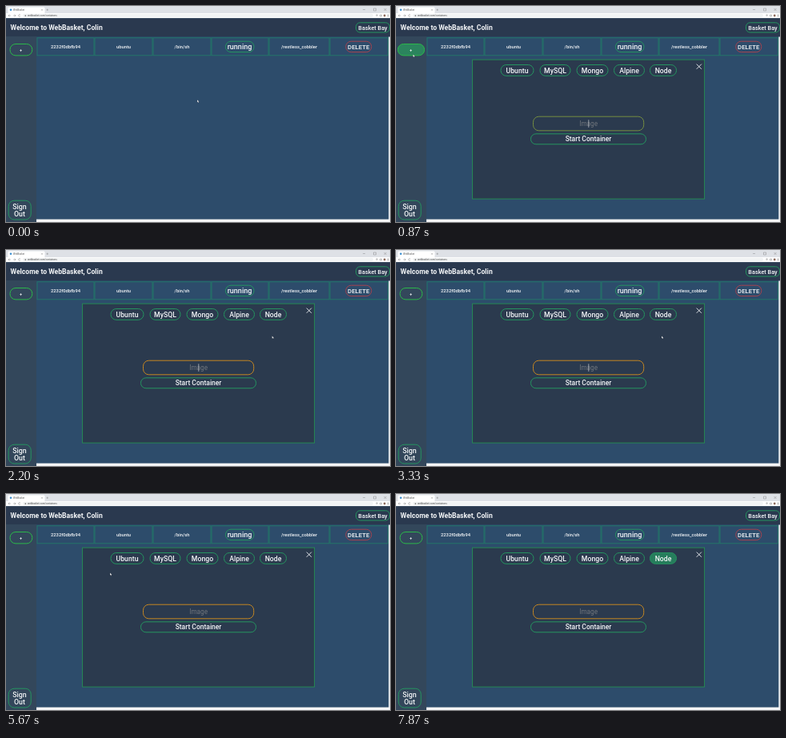
An HTML page that plays this animation: 480 px wide and 270 px high, repeating every 8000 ms.

```html
<!DOCTYPE html>
<html lang="en">
<head>
<meta charset="utf-8">
<title>Containers</title>
<style>
html, body { margin: 0; width: 100%; height: 100%; overflow: hidden; background: #2d4c6b; }
svg { display: block; width: 480px; height: 270px; }
text { font-family: Roboto, "Liberation Sans", sans-serif; font-weight: 500; fill: #f4f6f8; }
.mid { text-anchor: middle; }
</style>
</head>
<body>
<svg id="stage" viewBox="0 0 480 270"></svg>
<script>
const LOOP = 8000;
const GREEN = '#259460', TEAL = '#237a69', DARK = '#2b3a4e';
const stage = document.getElementById('stage');

function add(parent, tag, attrs, content) {
  const el = document.createElementNS('http://www.w3.org/2000/svg', tag);
  for (const key in attrs) el.setAttribute(key, attrs[key]);
  if (content) el.textContent = content;
  parent.appendChild(el);
  return el;
}
const box = (p, x, y, width, height, fill, more) =>
  add(p, 'rect', { x, y, width, height, fill, ...more });
const line = (p, d, stroke, width) =>
  add(p, 'path', { d, stroke, 'stroke-width': width, fill: 'none' });
const label = (p, x, y, size, str, style = '') =>
  add(p, 'text', { x, y, 'font-size': size, class: 'mid', style }, str);
const pill = (p, x, y, w, h, r, stroke, fill = 'none') =>
  box(p, x, y, w, h, fill, { rx: r, stroke, 'stroke-width': 1 });

// Browser bar
box(stage, 0, 0, 480, 9, '#dee1e6');
box(stage, 2.5, 1.5, 46, 8, '#fff', { rx: 1.5 });
add(stage, 'circle', { cx: 6, cy: 4.8, r: 1.3, fill: '#3b8fd0' });
add(stage, 'text', { x: 9, y: 5.9, 'font-size': 2.8, style: 'fill:#777' }, 'WebBasket');
line(stage, 'M44 3.8l2 2m0-2l-2 2M50.5 4.8h2.4m-1.2-1.2v2.4', '#777', 0.4);
line(stage, 'M446 4.5h3M459.5 3h3v3h-3zM472.5 3l3 3m0-3l-3 3', '#777', 0.4);
box(stage, 0, 9, 480, 6.3, '#fff');
box(stage, 21, 9.8, 438, 4.3, '#f1f3f4', { rx: 2.1 });
line(stage, 'M6 12H3m1.3-1.3L3 12l1.3 1.3M9 12h3m-1.3-1.3L12 12l-1.3 1.3M18 11.2a1.3 1.3 0 1 0 .1 1.3', '#666', 0.4);
box(stage, 23.6, 11.4, 1.5, 1.5, '#777');
add(stage, 'text', { x: 27, y: 13, 'font-size': 3, style: 'fill:#666' }, 'webbasket.com/containers');
line(stage, 'M464 12.8l-1-1a.7 .7 0 1 1 .2 .2M467.5 11h2v2h-2z', '#666', 0.4);
add(stage, 'circle', { cx: 473.2, cy: 12, r: 1.4, fill: '#8b6a5c' });
line(stage, 'M477.6 10.5v3', '#555', 0.6);

// Page
box(stage, 0, 15.3, 480, 23.2, '#2a394f');
box(stage, 0, 38, 38, 232, '#33475b');
box(stage, 38, 38.5, 440.5, 228.5, '#2d4c6b');
box(stage, 478.3, 38.5, 1.7, 231.5, '#e9ecef');
box(stage, 38, 266.6, 442, 3.4, '#f4f5f6');
add(stage, 'text', { x: 5.5, y: 30.2, 'font-size': 8.6, style: 'font-weight:700' },
  'Welcome to WebBasket, Colin');
pill(stage, 437.5, 20.8, 42, 12.2, 5, GREEN);
label(stage, 458.5, 29.5, 7.3, 'Basket Bay');

const plus = pill(stage, 5, 47.5, 27.8, 14.4, 7, '#2bb84a', '#27ae60');
label(stage, 18.6, 57, 5.8, '+');
pill(stage, 3.2, 243.2, 28, 23.8, 7, GREEN);
label(stage, 17, 253.8, 8.8, 'Sign');
label(stage, 17, 263.4, 8.8, 'Out');

// Container row
const edges = [38.5, 110.5, 183.5, 256.5, 328.5, 404.5, 478];
const cells = ['2232f0dbfb94', 'ubuntu', '/bin/sh', '', '/restless_cobbler', ''];
cells.forEach((str, i) => {
  const x = edges[i], w = edges[i + 1] - x;
  box(stage, x + 0.5, 39.8, w - 1, 22, 'none', { stroke: TEAL, 'stroke-width': 0.9 });
  if (str) label(stage, x + w / 2, 52.9, 5.8, str);
});
pill(stage, 274.5, 44.2, 35.5, 13.4, 6.5, GREEN);
label(stage, 292, 53.9, 9, 'running');
pill(stage, 424.8, 44.2, 32, 13.4, 6.5, '#a5434f');
label(stage, 440.8, 53.8, 7.8, 'DELETE');

// Dialog
const dialog = add(stage, 'g', {});
box(dialog, 95.6, 67.1, 290, 174, DARK, { stroke: '#268f52', 'stroke-width': 0.9 });
line(dialog, 'M375.7 72.6l6.2 6.2m0-6.2l-6.2 6.2', '#eef1f4', 0.9);
const images = [['Ubuntu', 131, 41], ['MySQL', 180, 38], ['Mongo', 226, 39], ['Alpine', 272.5, 38], ['Node', 317.5, 33]];
const choices = images.map(([str, x, w]) => {
  const el = pill(dialog, x, 73.5, w, 13.8, 6.8, GREEN, DARK);
  label(dialog, x + w / 2, 83.6, 8.7, str);
  return el;
});
const node = choices[4];
const field = pill(dialog, 171.5, 138.2, 138.2, 17.6, 7, GREEN);
label(dialog, 240.6, 150.2, 8.2, 'Image', 'fill:#70757c;font-weight:400');
const caret = box(dialog, 240.5, 142.3, 0.7, 9.6, '#c6cad0');
pill(dialog, 168.5, 159.8, 144, 13, 6.4, GREEN);
label(dialog, 240.5, 169.4, 8.5, 'Start Container');

const cursor = add(stage, 'path', { d: 'M0 0v3.2l.8-.7.6 1.2.6-.3-.6-1.1h1z', fill: '#fff', stroke: '#1b2330', 'stroke-width': 0.2 });

// time, x, y
const path = [
  [0, 239, 117.3], [760, 21.3, 60.6], [1040, 21.3, 60.6], [1800, 215, 122], [2200, 332.6, 107.4],
  [2500, 332.6, 107.4], [3000, 332, 107.4], [4070, 332, 107.4], [4800, 130, 98.6], [5800, 130, 98.6],
  [6680, 222, 100], [7000, 312, 99], [7150, 312, 99], [7480, 334, 82]
];
const clamp = v => Math.max(0, Math.min(1, v));
const ramp = (t, from, to) => clamp((t - from) / (to - from));
const ease = v => v * v * (3 - 2 * v);

function place(t) {
  let i = 0;
  while (i < path.length - 2 && t >= path[i + 1][0]) i++;
  const a = path[i], b = path[i + 1], k = ease(ramp(t, a[0], b[0]));
  return [a[1] + (b[1] - a[1]) * k, a[2] + (b[2] - a[2]) * k];
}
function mix(a, b, k) {
  return `rgb(${a.map((v, i) => Math.round(v + (b[i] - v) * k))})`;
}

function draw(t) {
  const [x, y] = place(t);
  cursor.setAttribute('transform', `translate(${x} ${y})`);
  cursor.style.visibility = t < 7480 ? 'visible' : 'hidden';
  const hover = ramp(t, 620, 780) * (1 - ramp(t, 1130, 1400));
  plus.setAttribute('fill-opacity', 0.6 * hover);
  plus.setAttribute('x', 5 - 2.7 * hover);
  plus.setAttribute('width', 27.8 + 5.4 * hover);
  dialog.style.visibility = t >= 870 ? 'visible' : 'hidden';
  field.setAttribute('stroke', mix([37, 148, 96], [196, 134, 34], ramp(t, 760, 980)));
  caret.style.visibility = t >= 870 && Math.floor((t - 870) / 532) % 2 === 0 ? 'visible' : 'hidden';
  node.setAttribute('fill', mix([43, 58, 78], [38, 125, 92], ramp(t, 7400, 7650)));
}

const start = performance.now();
function tick(now) {
  draw(Math.max(0, now - start) % LOOP);
  requestAnimationFrame(tick);
}
draw(0);
requestAnimationFrame(tick);
</script>
</body>
</html>
```
